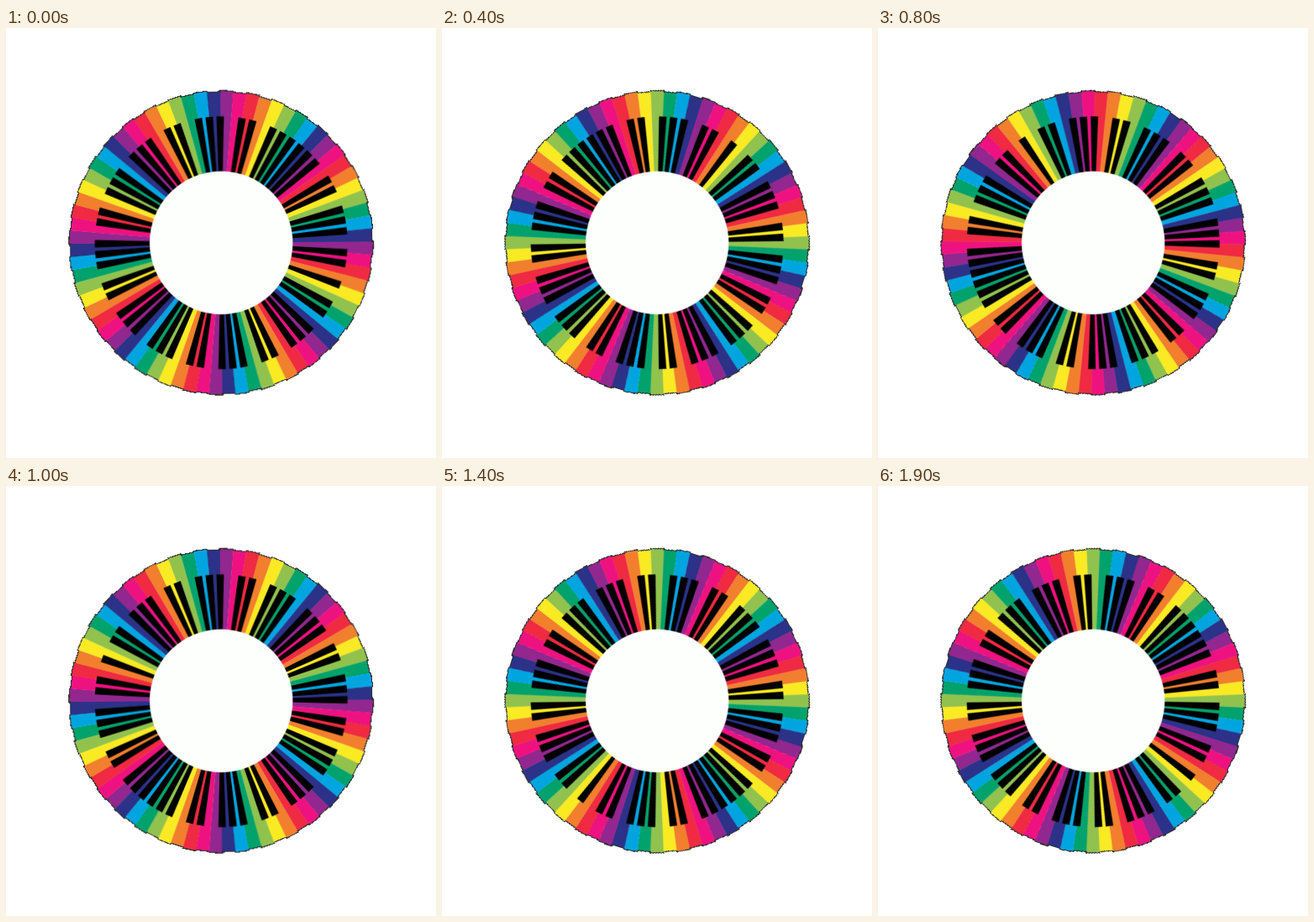
Recreate the animation shown at these times as an HTML page. Size 512 by 512 pixels, loop 2000 ms.

```html
<!DOCTYPE html>
<html lang="en">
<head>
<meta charset="utf-8">
<title>Rainbow piano wheel</title>
<style>
  html, body { margin: 0; width: 100%; height: 100%; overflow: hidden; background: #fff; }
  svg { display: block; width: 100vw; height: 100vh; }
  #wheel { transform-origin: 0 0; animation: spin 2s steps(20) infinite; }
  @keyframes spin { to { transform: rotate(-360deg); } }
</style>
</head>
<body>
<svg viewBox="-256 -256 512 512">
  <g transform="translate(0.2 -0.3)">
    <g id="wheel">
      <g id="keys" transform="rotate(-0.45)"></g>
    </g>
    <circle r="85.2" fill="#fdfffc"/>
  </g>
</svg>
<script>
  const STEP = 5;
  const KEY_COUNT = 360 / STEP;
  const INNER = 84;
  const BLACK_TIP = 150.5;
  const BLACK_HALF_WIDTH = 1.7;
  const COLORS = ['#92278f', '#ee1280', '#ef2a42', '#f17f2e', '#f9ea24',
                  '#91c24e', '#02a26c', '#00a5e0', '#2b3288'];
  // Sizes of the runs of black keys, each run followed by one gap.
  const BLACK_RUNS = [3, 2, 6, 2, 3, 2, 1, 2, 3, 2, 3, 2, 3, 3, 2, 3, 2, 3, 3, 2];
  const keys = document.getElementById('keys');

  function point(radius, degrees) {
    const a = degrees * Math.PI / 180;
    return `${(radius * Math.sin(a)).toFixed(2)},${(-radius * Math.cos(a)).toFixed(2)}`;
  }

  function addPath(d, attributes) {
    const path = document.createElementNS('http://www.w3.org/2000/svg', 'path');
    path.setAttribute('d', d);
    for (const name in attributes) path.setAttribute(name, attributes[name]);
    keys.append(path);
  }

  function addWedge(from, to, outer, fill) {
    addPath(`M${point(INNER, from)}L${point(outer, from)}L${point(outer, to)}L${point(INNER, to)}Z`, { fill });
  }

  let rim = '';
  for (let i = 0; i < KEY_COUNT; i++) {
    const from = i * STEP;
    const outer = i % 2 ? 180 : 181.3;
    addWedge(from, from + STEP + 0.12, outer, COLORS[i % COLORS.length]);
    rim += `${i ? 'L' : 'M'}${point(outer, from)}L${point(outer, from + STEP)}`;
  }
  addPath(rim + 'Z', {
    fill: 'none', stroke: '#303030', 'stroke-width': 1.2, 'shape-rendering': 'crispEdges'
  });

  let slot = -2;
  for (const size of BLACK_RUNS) {
    for (let i = 0; i < size; i++, slot++) {
      const middle = slot * STEP;
      addWedge(middle - BLACK_HALF_WIDTH, middle + BLACK_HALF_WIDTH, BLACK_TIP, '#000');
    }
    slot++;
  }
</script>
</body>
</html>
```
